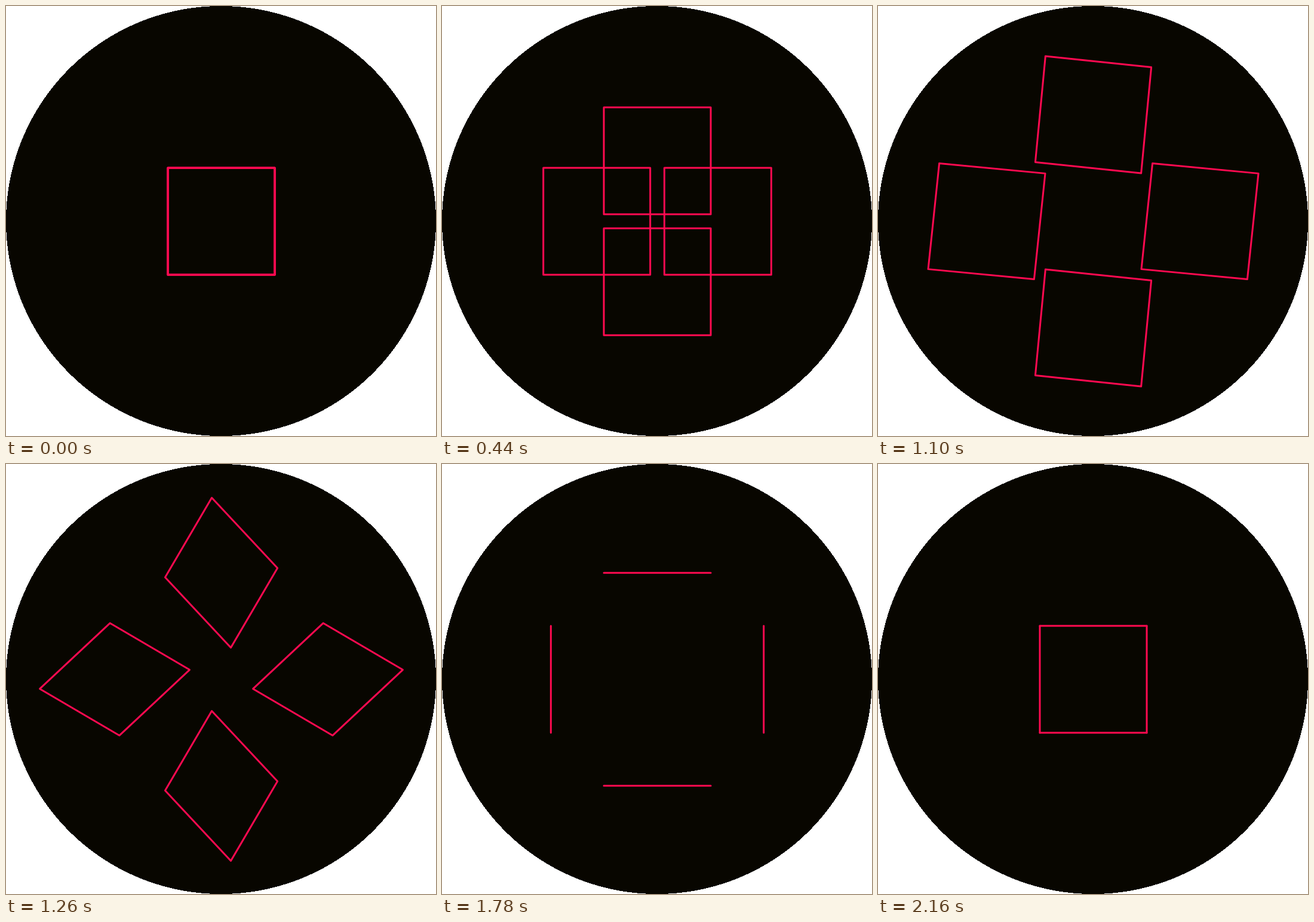
An HTML page with a canvas that plays this animation: 720x720 px, repeating every 2.34 s.

```html
<!DOCTYPE html>
<html lang="en">
<head>
<meta charset="utf-8">
<title>Unfolding squares</title>
<style>
  html, body { margin: 0; width: 100%; height: 100%; overflow: hidden; background: #fff; }
  canvas { display: block; width: 720px; height: 720px; }
</style>
</head>
<body>
<canvas id="stage" width="720" height="720"></canvas>
<script>
const ctx = document.getElementById('stage').getContext('2d');
const SIZE = 720;
const LOOP = 2340;
const STEP = 20;
const BEAT = 1000 / 30;
const CENTER = 360.5;
const HALF = 89.5;
const SPREAD = 178.5;
const DARK = '#080600';
const PINK = '#ff0a50';

// Bezier easing with flat ends; x1 and x2 are the handle positions in time.
function ease(x, x1, x2) {
  if (x <= 0) return 0;
  if (x >= 1) return 1;
  let lo = 0, hi = 1;
  for (let i = 0; i < 30; i++) {
    const t = (lo + hi) / 2, s = 1 - t;
    const at = 3 * s * s * t * x1 + 3 * s * t * t * x2 + t * t * t;
    if (at < x) lo = t; else hi = t;
  }
  return lo * lo * (3 - 2 * lo);
}

function phase(time, from, to, x1, x2) {
  return ease((time / BEAT - from) / (to - from), x1, x2);
}

function drawDisc() {
  ctx.fillStyle = '#fff';
  ctx.fillRect(0, 0, SIZE, SIZE);
  ctx.fillStyle = DARK;
  const r = SIZE / 2;
  for (let y = 0; y < SIZE; y++) {
    const w = Math.round(Math.sqrt(r * r - (y + 0.5 - r) ** 2));
    ctx.fillRect(r - w, y, 2 * w, 1);
  }
}

// Square turned by the same angle about all three axes, seen flat.
function foldedSquare(angle) {
  const c = Math.cos(angle), s = Math.sin(angle);
  return [[-1, -1], [1, -1], [1, 1], [-1, 1]].map(([u, v]) => [
    HALF * (u * c * c - v * (s * s * c + c * s)),
    HALF * (u * c * s + v * (c * c - s * s * s))
  ]);
}

function drawShape(points, cx, cy, turned) {
  ctx.beginPath();
  for (const [x, y] of points) {
    if (turned) ctx.lineTo(cx - y, cy + x);
    else ctx.lineTo(cx + x, cy + y);
  }
  ctx.closePath();
  ctx.stroke();
}

function draw(time) {
  const out = phase(time, 5, 25, 1 / 3, 1 / 3);
  const fold = phase(time, 30, 50, 1 / 3, 2 / 3);
  const back = phase(time, 53, 65, 1 / 3, 0.42);
  const offset = SPREAD * out - (SPREAD - HALF) * back;
  const points = foldedSquare(fold * Math.PI / 2);

  drawDisc();
  ctx.strokeStyle = PINK;
  ctx.lineWidth = 3;
  ctx.lineJoin = ctx.lineCap = 'round';
  for (const side of [-1, 1]) {
    drawShape(points, CENTER + side * offset, CENTER, false);
    drawShape(points, CENTER, CENTER + side * offset, true);
  }
}

const start = performance.now();
function tick() {
  const time = (performance.now() - start) % LOOP;
  draw(Math.floor(time / STEP) * STEP);
  requestAnimationFrame(tick);
}
tick();
</script>
</body>
</html>
```
